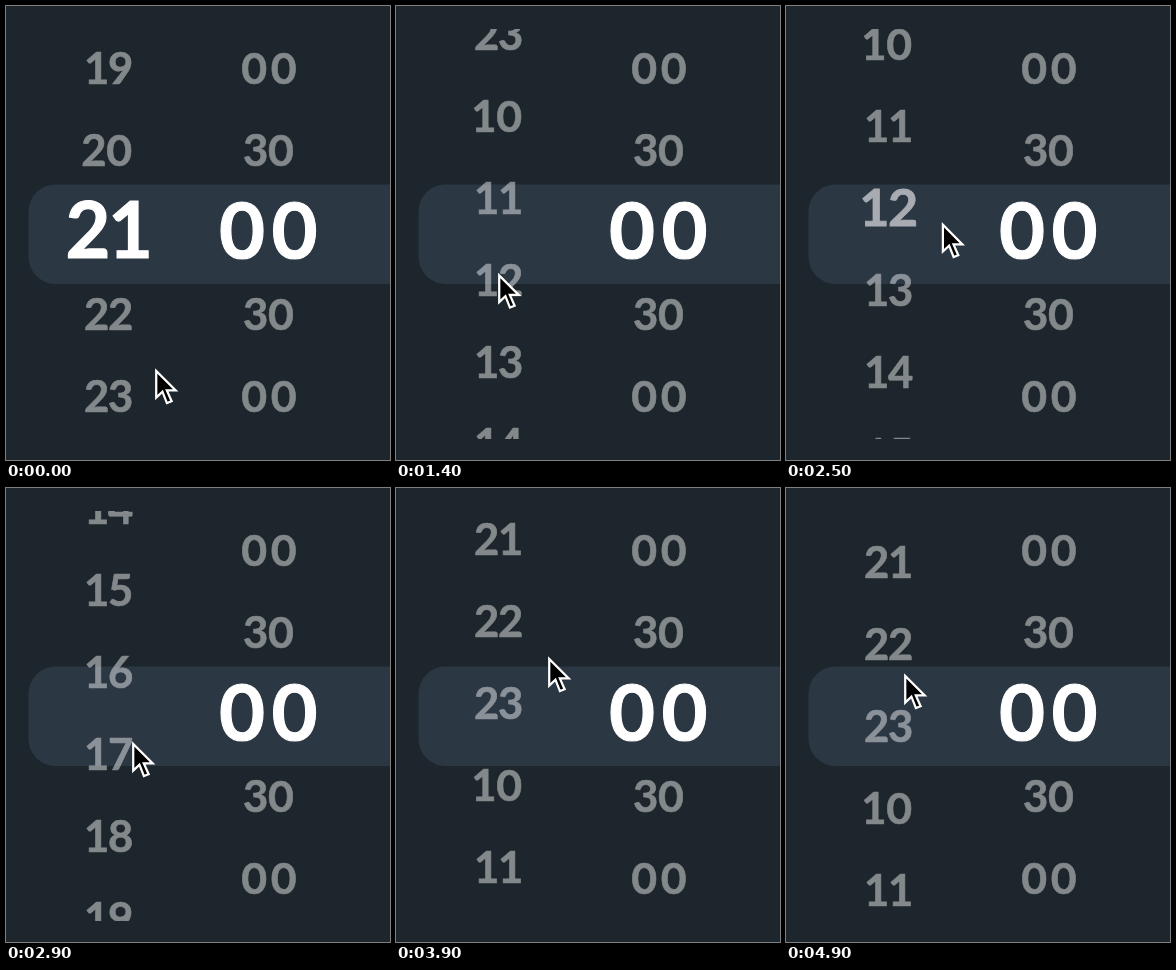
These frames come from a looping animation (384x454 px, 5 s). An HTML page:

```html
<!DOCTYPE html>
<html lang="en">
<head>
<meta charset="utf-8">
<title>Time picker</title>
<style>
  html, body { margin: 0; width: 100%; height: 100%; overflow: hidden; background: #1d262c; }
  svg { display: block; width: 384px; height: 454px; }
  text {
    font: 700 44px Lato, sans-serif; letter-spacing: -.03em; text-anchor: middle; white-space: pre;
    fill: #fff; stroke: #fff; stroke-width: .015em;
  }
  .zero { font-family: Inter, sans-serif; font-weight: 600; font-size: .97em; letter-spacing: .04em; }
</style>
</head>
<body>
<svg viewBox="0 0 384 454">
  <defs><clipPath id="window"><rect y="23" width="384" height="410"/></clipPath></defs>
  <rect width="384" height="454" fill="#1d262c"/>
  <rect x="22.5" y="178.5" width="420" height="99.5" rx="27" fill="#2c3744"/>
  <g clip-path="url(#window)">
    <g id="hours"></g>
    <g id="minutes"></g>
  </g>
  <path id="cursor" d="M1.2 2.8V29L7.3 23.2L11.7 34.4L16.3 32.6L11.6 22H20.3Z"
        fill="#000" stroke="#fff" stroke-width="2.2" stroke-miterlimit="6"/>
</svg>
<script>
const LOOP = 5000, STEP = 100;
const PITCH = 82, MIDDLE = 241.8;
const HOUR_X = 102, MINUTE_X = 263.8;
const FIRST_HOUR = 10, HOUR_COUNT = 14;
const COAST = 269, SETTLE = 200;

// Each drag moves the list, lets it coast towards `rest`, then snaps to a whole row.
const DRAGS = [
  { grab: 600, release: 1000, snap: 2200, from: 11, to: 12.567, rest: 16.24, power: 3 },
  { grab: 2400, release: 3100, snap: 4200, from: 16, to: 24, rest: 27.3, power: 1.7 },
  { grab: 4700, release: 5000, snap: 6000, from: 27, to: 26.775, rest: 26.775, power: 1 }
];

// Pointer stops: [ms, x, y]
const STOPS = [
  [0, 149, 362], [300, 73, 260], [500, 236, 182], [700, 125, 204], [1000, 122, 76],
  [1400, 102, 266.5], [2100, 110, 344], [2300, 229, 290], [2600, 130, 190], [2900, 126, 253],
  [3100, 142, 0], [3900, 152, 168], [4700, 122, 173], [4900, 118, 185]
];

const byId = id => document.getElementById(id);
const clamp = v => Math.min(1, Math.max(0, v));
const mix = (a, b, k) => a + (b - a) * k;
const smooth = k => k * k * (3 - 2 * k);

function listAt(t) {
  const drag = DRAGS.findLast(d => t >= d.grab);
  if (!drag) return { scroll: DRAGS[0].from, growth: 1 };
  const { grab, release, snap, from, to, rest, power } = drag;
  const coast = time => mix(rest, to, Math.exp((release - time) / COAST));
  const settled = clamp((t - snap) / SETTLE);
  const shrunk = clamp((t - grab) / SETTLE);
  const scroll = t < release
    ? mix(from, to, ((t - grab) / (release - grab)) ** power)
    : mix(coast(Math.min(t, snap)), Math.round(rest), smooth(settled));
  return { scroll, growth: Math.max((1 - shrunk) ** 2, settled ** 2) };
}

function pointerAt(t) {
  const next = Math.max(1, STOPS.findIndex(stop => stop[0] >= t));
  const [t0, x0, y0] = STOPS[next - 1], [t1, x1, y1] = STOPS[next];
  const k = smooth((t - t0) / (t1 - t0));
  return [mix(x0, x1, k), mix(y0, y1, k)];
}

function addLabel(parent) {
  const label = document.createElementNS("http://www.w3.org/2000/svg", "text");
  parent.append(label);
  return label;
}

function setLabel(label, value, x, y, growth) {
  if (label.dataset.value !== value) {
    label.dataset.value = value;
    label.innerHTML = value.replace(/0/g, '<tspan class="zero">0</tspan>');
  }
  label.setAttribute("x", x);
  label.setAttribute("y", y + 10.4 * growth);
  label.style.fontSize = mix(43.6, 77.5, growth) + "px";
  label.style.opacity = mix(.45, 1, growth);
}

const hours = Array.from({ length: 7 }, () => addLabel(byId("hours")));

["00", "30", "00", "30", "00"].forEach((value, i) =>
  setLabel(addLabel(byId("minutes")), value, MINUTE_X, MIDDLE + (i - 2) * PITCH, i === 2 ? 1 : 0));

function draw(t) {
  const { scroll, growth } = listAt(t);
  const [x, y] = pointerAt(t);
  const selected = Math.round(scroll);
  hours.forEach((label, i) => {
    const row = selected + i - 3;
    const hour = FIRST_HOUR + row % HOUR_COUNT;
    setLabel(label, String(hour), HOUR_X, MIDDLE + (row - scroll) * PITCH, row === selected ? growth : 0);
  });
  byId("cursor").setAttribute("transform", `translate(${x} ${y}) scale(1.02)`);
}

function tick() {
  draw(Math.floor(performance.now() % LOOP / STEP) * STEP);
  requestAnimationFrame(tick);
}
tick();
</script>
</body>
</html>
```
